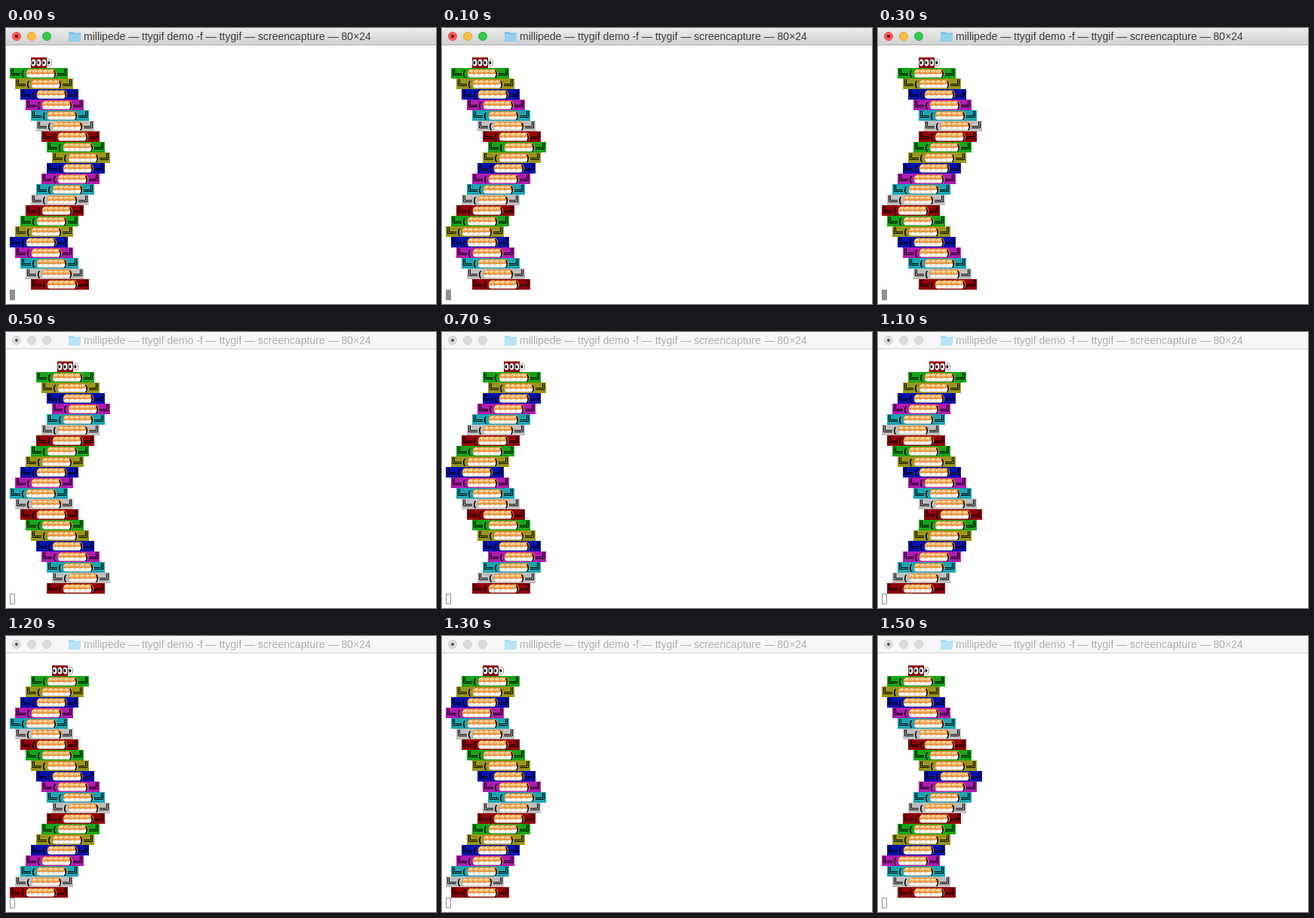
An HTML page for the animation above (1600 ms loop, 570 by 366 pixels).

```html
<!DOCTYPE html>
<html lang="en">
<head>
<meta charset="utf-8">
<title>millipede</title>
<style>
  html, body { margin: 0; width: 100%; height: 100%; overflow: hidden; background: #fff; }
  svg { display: block; width: 570px; height: 366px; }
  .title { font: 14px "Liberation Sans", Arial, sans-serif; }
  .paren { font: bold 11.67px "Liberation Mono", monospace; }
</style>
</head>
<body>
<svg viewBox="0 0 570 366">
  <defs>
    <linearGradient id="chrome" x2="0" y2="1">
      <stop offset="0" stop-color="#eaeaea"/>
      <stop offset="1" stop-color="#d2d2d2"/>
    </linearGradient>
    <g id="sushi">
      <rect x="1.2" y="5" width="11" height="7.4" rx="3" fill="#fdfaf4" stroke="#c9b39a" stroke-width=".6"/>
      <path d="M.8 7.5C.8 3 3.5 1.4 7 1.4S12.800 3 12.800 7.500C11 8.900 9.500 7 7 7.200S2.800 9 .8 7.500Z" fill="#ee9a3c" stroke="#c8702c" stroke-width=".5"/>
      <path d="M2.300 5.600C3 3.300 4.600 2.900 6.200 3M5 6C5.600 4.300 7 3.800 9 4" fill="none" stroke="#ffe6b8" stroke-width="1.300"/>
    </g>
    <g id="eye">
      <ellipse cx="3.500" cy="7" rx="3.100" ry="4.700" fill="#fff" stroke="#5a4a48" stroke-width=".6"/>
      <ellipse cx="2.900" cy="7" rx="1.500" ry="2.200" fill="#201a1a"/>
    </g>
    <g id="legs">
      <path d="M2.500 1V9.500H14M4.500 1V7.500H14M63 9.500H74.500V1M63 7.500H72.500V1" fill="none" stroke="#000"/>
      <text class="paren" x="14" y="11">(</text>
      <g id="meal"></g>
      <text class="paren" x="56" y="11">)</text>
    </g>
  </defs>
  <g id="bars"></g>
  <g id="bug"></g>
</svg>
<script>
const LOOP = 1600, STEPS = 16, CELL = 7, LINE = 14, ROWS = 21;
const BLUR_AT = 500;
const RED = '#930008';
const COLORS = ['#17a41a', '#98961a', '#0613ae', '#b01bb0', '#1aa5b1', '#bebebe', RED];
const TITLE = 'millipede — ttygif demo -f — ttygif — screencapture — 80×24';

function add(parent, tag, attrs, text) {
  const el = document.createElementNS('http://www.w3.org/2000/svg', tag);
  for (const key in attrs) el.setAttribute(key, attrs[key]);
  if (text) el.textContent = text;
  return parent.appendChild(el);
}
const byId = id => document.getElementById(id);

// Title bar and cursor, once per focus state
function chrome(focused) {
  const g = add(byId('bars'), 'g', {});
  const lights = focused ? ['#fc5753', '#fdbc40', '#34c84a'] : Array(3).fill('#dcdcdc');
  const rims = focused ? ['#df4744', '#de9f34', '#27aa35'] : Array(3).fill('#cbcbcb');
  add(g, 'path', {
    d: 'M0 22V4Q0 0 4 0H566Q570 0 570 4V22Z',
    fill: focused ? 'url(#chrome)' : '#f6f6f6'
  });
  add(g, 'rect', { y: 22, width: 570, height: 1, fill: focused ? '#b1b1b1' : '#d1d1d1' });
  lights.forEach((fill, i) =>
    add(g, 'circle', { cx: 14 + 20 * i, cy: 11, r: 5.6, fill, stroke: rims[i], 'stroke-width': .8 }));
  add(g, 'circle', { cx: 14, cy: 11, r: 2, fill: focused ? '#4d0000' : '#555' });
  add(g, 'path', {
    d: 'M83 6Q83 5 84 5H89L90.500 6.500H98Q99 6.500 99 7.500V17Q99 18 98 18H84Q83 18 83 17Z',
    fill: focused ? '#7cc0e4' : '#a9dbf3'
  });
  add(g, 'rect', { x: 83, y: 8, width: 16, height: 10, rx: 1, fill: focused ? '#93d0ee' : '#b8e4f7' });
  add(g, 'text', { class: 'title', x: 103, y: 16, fill: focused ? '#3c3c3c' : '#b0b0b0' }, TITLE);
  add(g, 'rect', focused
    ? { x: 5, y: 347, width: 7, height: 14, fill: '#919191' }
    : { x: 5.5, y: 347.5, width: 6, height: 13, fill: 'none', stroke: '#919191' });

  const [first, then] = focused ? ['visible', 'hidden'] : ['hidden', 'visible'];
  g.animate([
    { offset: 0, visibility: first, easing: 'step-end' },
    { offset: BLUR_AT / LOOP, visibility: then, easing: 'step-end' },
    { offset: 1, visibility: then }
  ], { duration: LOOP, iterations: Infinity });
}

// Triangle wave: eight cells right, eight cells back
const sway = Array.from({ length: STEPS + 1 }, (_, k) => ({
  offset: k / STEPS,
  transform: `translateX(${CELL * (8 - Math.abs(8 - k))}px)`,
  easing: 'step-end'
}));

// Each row runs one step ahead of the row above
function segment(y, lead) {
  const line = add(byId('bug'), 'g', { transform: `translate(5 ${y})` });
  const g = add(line, 'g', {});
  g.animate(sway, { duration: LOOP, iterations: Infinity, delay: -lead * LOOP / STEPS });
  return g;
}

chrome(true);
chrome(false);

for (let i = 0; i < 5; i++) add(byId('meal'), 'use', { href: '#sushi', x: 21 + CELL * i });

const head = segment(39, 0);
add(head, 'rect', { x: 28, width: 21, height: LINE, fill: RED });
for (let i = 0; i < 4; i++) add(head, 'use', { href: '#eye', x: 28 + CELL * i });

for (let i = 0; i < ROWS; i++) {
  const row = segment(53 + LINE * i, i);
  add(row, 'rect', { width: 77, height: LINE, fill: COLORS[i % COLORS.length] });
  add(row, 'use', { href: '#legs' });
}
</script>
</body>
</html>
```
